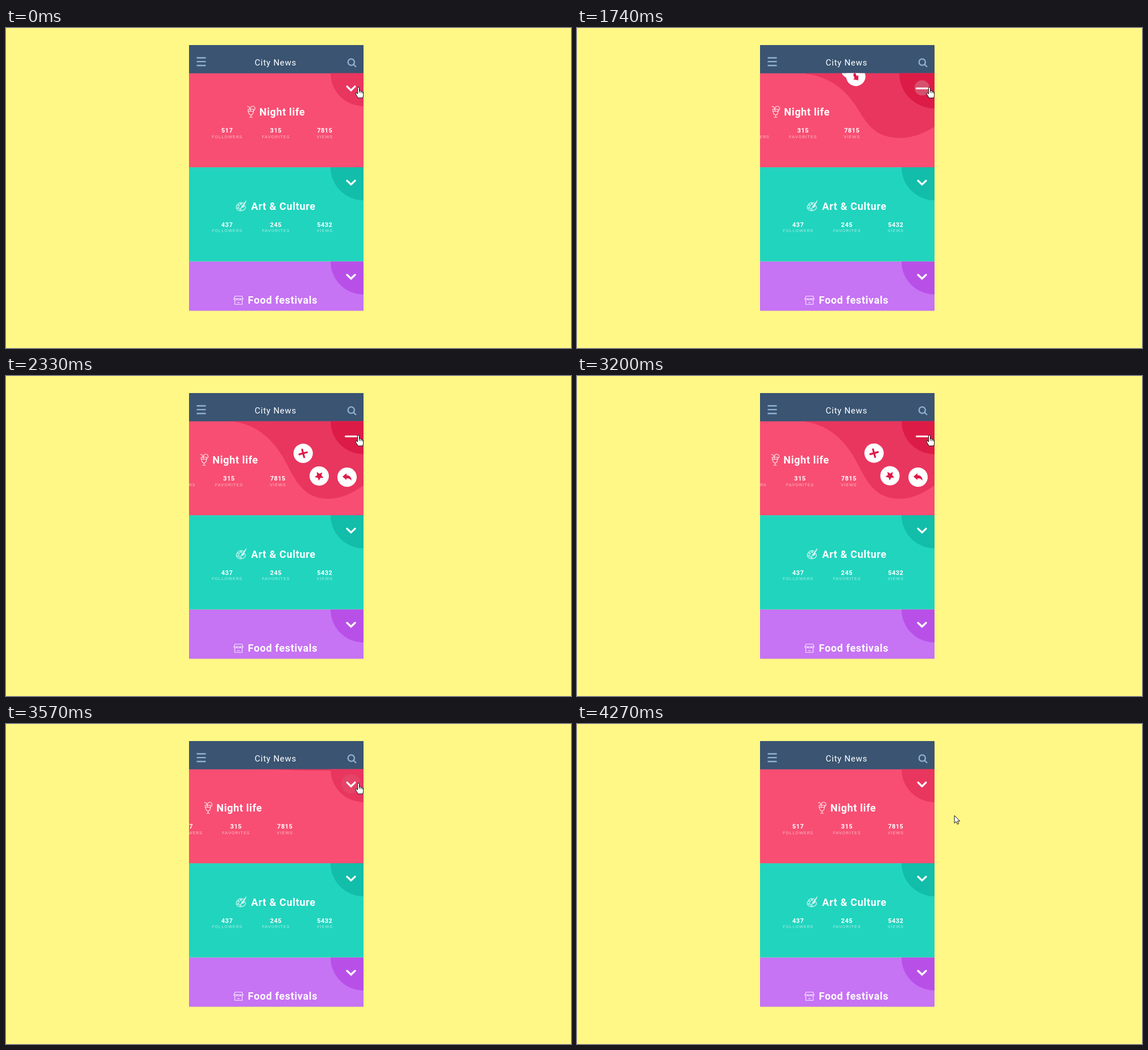
Animation of 994x563 px, one loop 7.35 s. Source, as an HTML page:

```html
<!DOCTYPE html>
<html lang="en">
<head>
<meta charset="utf-8">
<title>City News</title>
<style>
  html, body { margin: 0; width: 100%; height: 100%; overflow: hidden; background: #fff886; }
  svg { display: block; }
  text { font-family: Roboto, sans-serif; fill: #fff; }
  .heading { font-size: 15px; letter-spacing: .75px; }
  .title { font-size: 18px; font-weight: 700; letter-spacing: .65px; }
  .count { font-size: 11px; font-weight: 700; letter-spacing: .5px; text-anchor: middle; }
  .label { font-size: 8px; letter-spacing: 1px; text-anchor: middle; opacity: .58; }
  .line { fill: none; stroke: #fff; stroke-width: 1.1; stroke-linecap: round; stroke-linejoin: round; opacity: .85; }
  .chevron { fill: none; stroke: #fff; stroke-width: 3.4; stroke-linecap: round; stroke-linejoin: round; }
  .bar { fill: none; stroke: #92b2d2; stroke-width: 2.3; }
  .cursor { fill: #fff; stroke: #111; stroke-width: 1; stroke-linejoin: round; }
</style>
</head>
<body>
<svg width="994" height="563" viewBox="0 0 994 563">
  <defs>
    <clipPath id="phone"><rect x="322" y="30" width="307" height="467.5"/></clipPath>
    <clipPath id="card"><rect x="322" width="307" height="165.6"/></clipPath>
    <g id="drink" class="line">
      <path d="M-6.500-9.500L-3-8.500L-1-2M-5-4.500H4.500V-1L3 4Q0 7 -3 4L-5-1ZM0 6V9.500M-2.500 9.500H2.500M-4.500-1H4"/>
      <path d="M-1-5.500A4 4 0 1 1 5-2.500"/>
    </g>
    <g id="palette" class="line">
      <path d="M4-5Q-2-8-6-3Q-11 3-6 7Q-1 10 5 7Q9 4 7 0Q5-1 4 2Q1 4 1 1"/>
      <path d="M9-9L2 0L0 3L4 1Z" fill="#fff"/>
      <circle cx="-4" cy="-1" r="1.400"/><circle cx="-5" cy="3.500" r="1.400"/>
      <circle cx="-1" cy="5.500" r="1.400"/><circle cx="0" cy="-3.500" r="1.200"/>
    </g>
    <g id="store" class="line">
      <path d="M-6-7H6L8-2.500Q8 0 6 0T3-2Q2.500 0 0 0T-3-2Q-3.500 0 -6 0T-8-2.500ZM-8-2.500H8M-6.500 1V7.500H6.500V1M-2 4.500H2"/>
    </g>
  </defs>
  <rect width="994" height="563" fill="#fff886"/>
  <g clip-path="url(#phone)">
    <rect x="322" y="30" width="307" height="50" fill="#3a5472"/>
    <path class="bar" d="M335.500 52.500H351.500M335.500 59.200H351.500M335.500 66H351.500"/>
    <circle class="bar" cx="607.300" cy="60" r="5.600"/>
    <path class="bar" stroke-width="3" d="M611.300 64L616 68.500"/>
    <text class="heading" x="437.500" y="66.300">City News</text>
    <g id="cards"></g>
  </g>
  <path id="hand" class="cursor" d="M-1.500 1.500Q-1.500 0 0 0T1.500 1.500V6.500Q4 5.500 4.500 7.500Q6.500 6.500 7.200 8.300Q8.800 8 8.800 10V13.500Q8.800 16 7.500 19H-1Q-2 16-5 12Q-5.500 9.500-3.200 10.200L-1.500 12ZM1.500 6.500V10M4.500 7.500V10.500M7.200 8.300V11"/>
  <path id="arrow" class="cursor" d="M0 0V13.500L3.200 10.600L5.300 15.300L7.600 14.300L5.400 9.800H9.600Z"/>
</svg>
<script>
const LOOP = 7350;
const CARD_HEIGHT = 165.6;
const $ = id => document.getElementById(id);

const cards = [
  { name: 'Night life', x: 445.8, icon: 'drink', iconX: 431, fill: '#f84e73', corner: '#e8365f', counts: [517, 315, 7815] },
  { name: 'Art &amp; Culture', x: 431.2, icon: 'palette', iconX: 413.500, fill: '#21d4be', corner: '#12bdaa', counts: [437, 245, 5432] },
  { name: 'Food festivals', x: 425.6, icon: 'store', iconX: 409, fill: '#c673f4', corner: '#b850e8', counts: [] }
];
const columns = [['FOLLOWERS', 389], ['FAVORITES', 474.8], ['VIEWS', 560.8]];

const starPoints = Array.from({ length: 10 }, (_, i) => {
  const r = i % 2 ? 4 : 8.3, a = i * Math.PI / 5;
  return `${r * Math.sin(a)},${-r * Math.cos(a)}`;
}).join(' ');

// Round action buttons: distance along the track when open, resting tilt, glyph.
const actions = [
  { end: 126, tilt: -15, glyph: '<path d="M-7 0H7M0-7V7" stroke="#e0194a" stroke-width="3.2" stroke-linecap="round"/>' },
  { end: 175, tilt: 40, glyph: `<polygon points="${starPoints}"/>` },
  { end: 232, tilt: 0, glyph: '<path d="M-8-1L-1-7V-3.500Q7-3.500 8 6Q4 1.500-1 2V5Z"/>' }
];

const actionMarkup = actions.map(a =>
  `<g class="action" fill="#e0194a"><circle r="17" fill="#fff"/>${a.glyph}</g>`).join('');

const menuMarkup = `
  <path id="wave" fill="#e8365f" d="M392 0C440 3 470 32 490 68C507 99 520 136.500 568 136.500C590 136.500 610 126 629 113V0Z"/>
  ${actionMarkup}`;

$('cards').innerHTML = cards.map((c, i) => `
  <g transform="translate(0 ${79.5 + i * CARD_HEIGHT})" clip-path="url(#card)">
    <rect x="322" width="307" height="${CARD_HEIGHT + 1}" fill="${c.fill}"/>
    ${i ? '' : menuMarkup}
    <g class="name">
      <use href="#${c.icon}" x="${c.iconX}" y="68"/>
      <text class="title" x="${c.x}" y="74.7">${c.name}</text>
    </g>
    <g class="stats">${c.counts.map((n, k) => `
      <text class="count" x="${columns[k][1]}" y="104.700">${n}</text>
      <text class="label" x="${columns[k][1]}" y="114.200">${columns[k][0]}</text>`).join('')}
    </g>
    <circle class="corner" cx="629" cy="0" r="58" fill="${c.corner}"/>
    <circle class="ripple" cx="607" cy="25.800" r="13" fill="#cacaca" opacity="0"/>
    <path class="chevron" d="M600 23.500L607 30.300L614 23.500"/>
  </g>`).join('');

const first = name => document.querySelector('.' + name);
const part = Object.fromEntries(
  ['name', 'stats', 'corner', 'ripple', 'chevron'].map(n => [n, first(n)]));
const buttons = [...document.querySelectorAll('.action')];

const track = document.createElementNS('http://www.w3.org/2000/svg', 'path');
track.setAttribute('d', 'M452 32C476 66 500 96 516 124C534 156 550 187 577 187C588 187 594 184 600 178');

const clamp = v => Math.min(1, Math.max(0, v));
const mix = (a, b, p) => a + (b - a) * p;
const linear = p => p;

// CSS "ease": cubic-bezier(.25, .1, .25, 1)
function ease(x) {
  const bezier = (a, b, u) => 3 * a * u * (1 - u) ** 2 + 3 * b * u * u * (1 - u) + u ** 3;
  let lo = 0, hi = 1;
  for (let i = 0; i < 20; i++) {
    const mid = (lo + hi) / 2;
    if (bezier(.25, .25, mid) < x) lo = mid; else hi = mid;
  }
  return bezier(.1, 1, lo);
}

const ramp = (t, start, length, curve = ease) => {
  const p = clamp((t - start) / length);
  return p === 0 || p === 1 ? p : curve(p);
};

// Piecewise linear value through [time, value] steps.
function steps(t, table) {
  const i = table.findIndex(([time]) => time > t);
  if (i < 0) return table[table.length - 1][1];
  if (i === 0) return table[0][1];
  const [t0, v0] = table[i - 1], [t1, v1] = table[i];
  return mix(v0, v1, (t - t0) / (t1 - t0));
}

const move = (el, x, y, rest = '') => el.setAttribute('transform', `translate(${x} ${y}) ${rest}`);

function drawMenu(t) {
  const wave = ramp(t, 1385, 665) - ramp(t, 3205, 445);
  const name = ramp(t, 1400, 400) - ramp(t, 3543, 300);
  const stats = ramp(t, 1500, 350) - ramp(t, 3530, 310);
  const flat = ramp(t, 1400, 400) - ramp(t, 3205, 300);
  const slide = ramp(t, 1621, 424, linear) - ramp(t, 3200, 300, linear);
  const dark = ramp(t, 1520, 200, linear) - ramp(t, 3205, 300, linear);

  $('wave').setAttribute('transform', `scale(1 ${wave})`);
  move(part.name, -82.5 * name, 0);
  move(part.stats, -82.5 * stats, 0);

  buttons.forEach((button, i) => {
    const { end, tilt } = actions[i];
    const p = track.getPointAtLength(end * slide);
    move(button, p.x, p.y - 79.5, `rotate(${tilt - 180 * (1 - slide)})`);
    button.style.display = slide > 0 ? '' : 'none';
  });

  const pulse = Math.sin(Math.PI * clamp((t - 1550) / 380));
  part.corner.setAttribute('r', 58 + 4 * pulse);
  const tone = [[232, 220], [54, 28], [95, 70]].map(([a, b]) => Math.round(mix(a, b, dark)));
  part.corner.setAttribute('fill', `rgb(${tone})`);

  const angle = Math.PI / 4 * (1 - flat);
  const arm = mix(9.7, 9.5, flat);
  const dx = arm * Math.cos(angle), dy = arm * Math.sin(angle) / 2;
  part.chevron.setAttribute('d', `M${607 - dx} ${26.8 - dy}L607 ${26.8 + dy}L${607 + dx} ${26.8 - dy}`);
  part.chevron.style.strokeWidth = mix(3.4, 3, flat);

  const closing = t > 3000;
  const fade = closing
    ? steps(t, [[3225, 0], [3230, 1], [3450, .3], [3570, .09], [3640, 0]])
    : steps(t, [[1495, 0], [1500, 1], [1740, .3], [1880, 0]]);
  part.ripple.setAttribute('opacity', fade);
  part.ripple.setAttribute('r', closing ? steps(t, [[3230, 13], [3570, 17]]) : 13.3);
}

function drawCursor(t) {
  const p = ramp(t, 3980, 290, v => v * v * (3 - 2 * v));
  const x = mix(620, 664, p), y = mix(104, 161, p);
  const away = x > 629;
  $('hand').style.display = away ? 'none' : '';
  $('arrow').style.display = away ? '' : 'none';
  move($('hand'), x, y);
  move($('arrow'), x, y);
}

const start = performance.now();
function frame() {
  const t = (performance.now() - start) % LOOP;
  drawMenu(t < 1500 ? 0 : t);
  drawCursor(t);
  requestAnimationFrame(frame);
}
frame();
</script>
</body>
</html>
```
